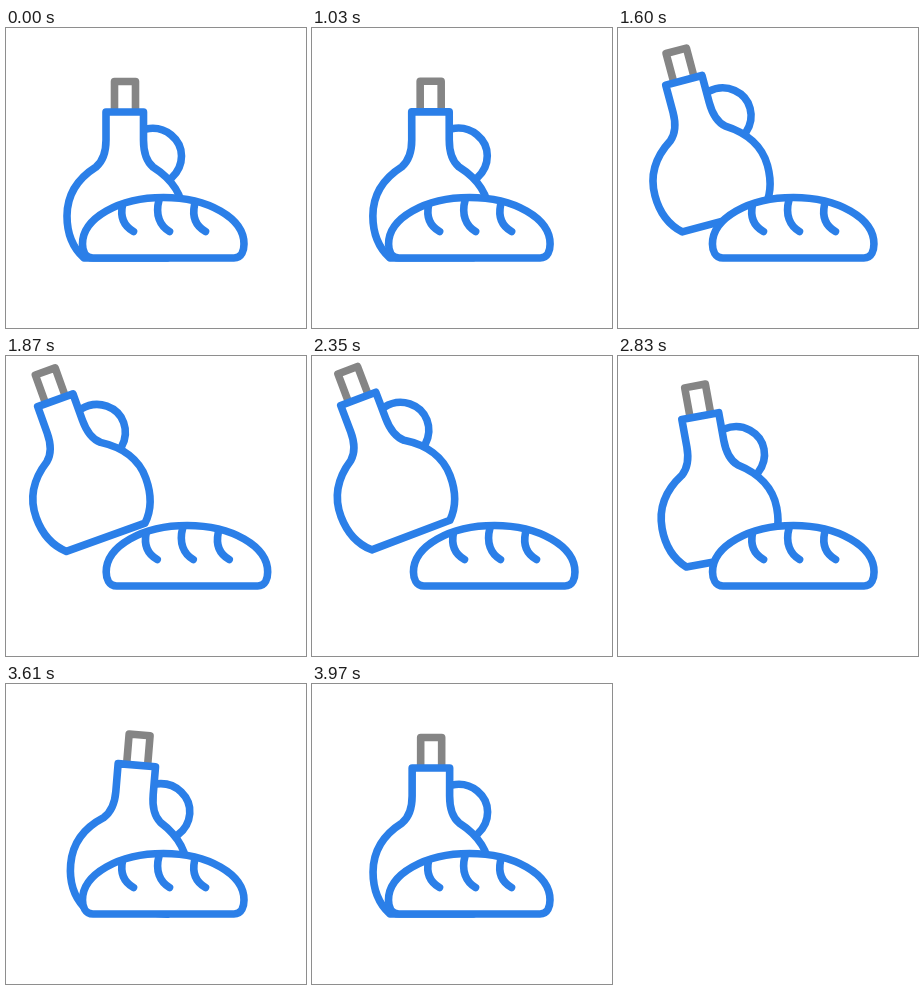
An HTML page for the animation above (4030 ms loop, 300 by 300 pixels).

```html
<!DOCTYPE html>
<html>
<head>
<meta charset="utf-8">
<style>
  html, body { margin: 0; width: 100%; height: 100%; overflow: hidden; background: #fff; }
  svg { display: block; width: 100vw; height: 100vh; }
  path { fill: none; stroke: #2b7fe8; stroke-width: 7.6; stroke-linecap: round; stroke-linejoin: round; }
  .cork { stroke: #858585; }
  .solid { fill: #fff; }
</style>
</head>
<body>
<svg viewBox="0 0 300 300">
  <g id="bottle">
    <path class="cork" d="M108.500 82V53.500H129.500V82"/>
    <path d="M140 101C160 97 175.500 112 175.500 128C175.500 138 171 145 165.500 150"/>
    <path d="M100 84H137.500V112C137.500 125 140 133 147 139C166 151 177.500 168 177.500 188C177.500 206 172 220 161.500 230H78C67 220 61 206 61 188C61 168 71 151 90 139C97 133 100 125 100 112Z"/>
  </g>
  <g id="bread">
    <path class="solid" d="M87 230C79 230 76.500 222 76.500 216C76.500 190 113 169.500 157.500 169.500S238 190 238 216C238 222 236 230 228 230Z"/>
    <path d="M116.500 177C114 189 118 198 127.500 203.500M153 172C149 187 154 198 163.500 203.500M188.500 177C186 189 190 198 199.500 203.500"/>
  </g>
</svg>
<script>
const LOOP = 4030;
const bottle = document.getElementById('bottle');
const bread = document.getElementById('bread');

// Progress from start to end along cubic-bezier(a, 0, b, 1)
function ease(t, start, end, a, b) {
  const x = Math.min(1, Math.max(0, (t - start) / (end - start)));
  let lo = 0, hi = 1;
  for (let i = 0; i < 24; i++) {
    const s = (lo + hi) / 2, r = 1 - s;
    if (3 * r * r * s * a + 3 * r * s * s * b + s ** 3 < x) lo = s; else hi = s;
  }
  return lo * lo * (3 - 2 * lo);
}

function draw(t) {
  const out = ease(t, 1000, 2150, .25, .45);
  const slide = out - ease(t, 2100, 3500, .77, .55);
  const land = out - ease(t, 2100, 3250, .8, .54);
  const swing = ease(t, 2100, 3550, .74, .34);
  const settle = ease(t, 3550, 4000, .33, .67);

  const angle = -21.3 * out + 26.3 * swing - 5 * settle;
  const dx = -21.5 * land;
  const dy = -52 * land - 3.5 * (swing - settle);
  bottle.setAttribute('transform', `translate(${dx} ${dy}) rotate(${angle} 118.5 230)`);
  bread.setAttribute('transform', `translate(${25.5 * slide} 0)`);
}

const begin = performance.now();
function tick() {
  draw((performance.now() - begin) % LOOP);
  requestAnimationFrame(tick);
}
tick();
</script>
</body>
</html>
```
